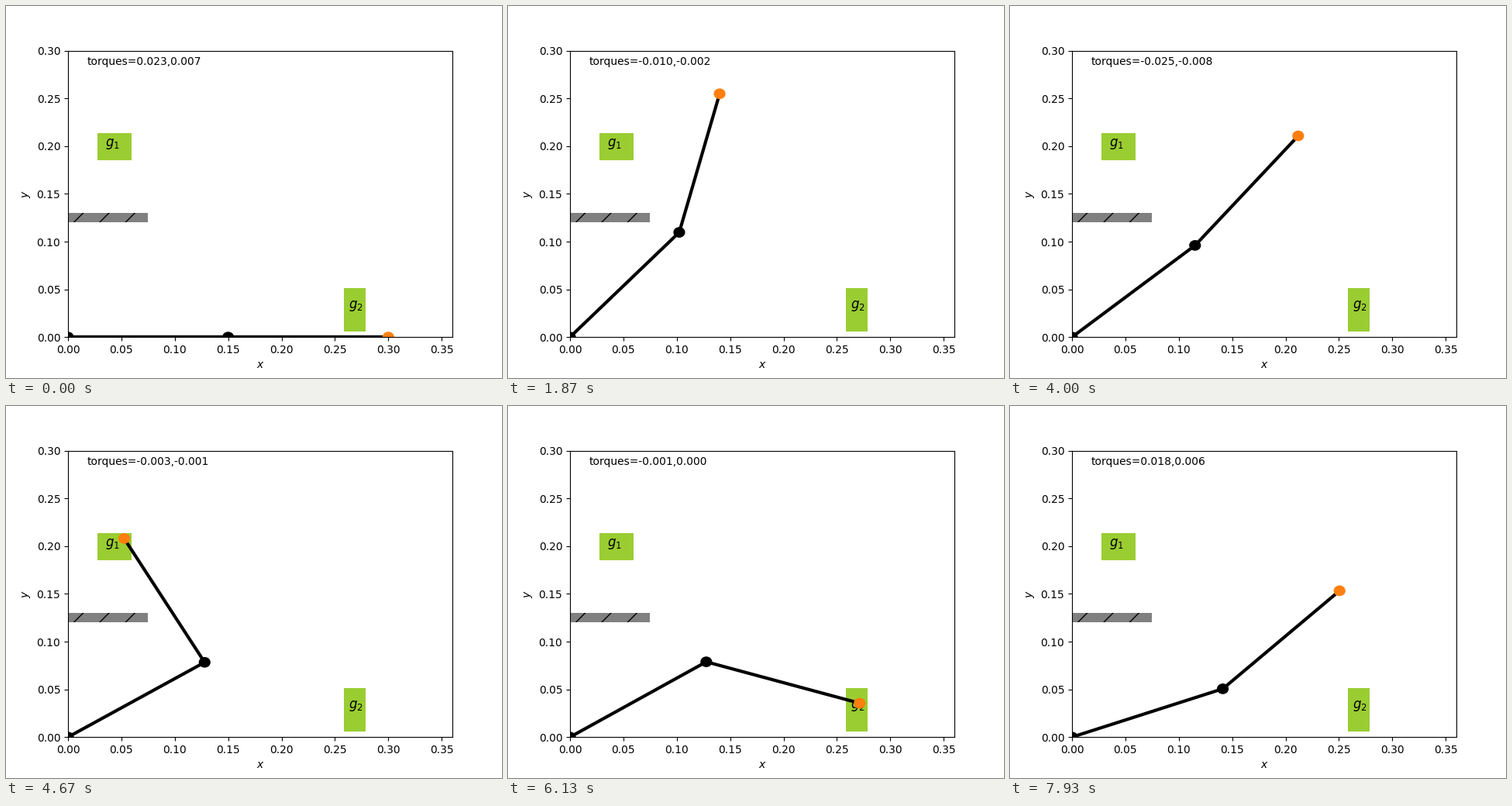
Animation, 640 px wide and 480 px high, one loop 8000 ms. Source, as a matplotlib script:

```python
import matplotlib.pyplot as plt
import numpy as np
from matplotlib.animation import FuncAnimation
from matplotlib.patches import Circle, Rectangle

LOOP_MS = 8000
FRAMES = 120
LINK = 0.15

# step, shoulder angle, elbow angle (degrees), torques
POSES = [
    (0, 0, 0, 0.023, 0.007),
    (28, 47, 28.4, -0.010, -0.002),
    (46, 16, 80.8, -0.003, 0.001),
    (60, 39.8, 10.1, -0.025, -0.008),
    (81, 34.6, -15.2, -0.011, -0.003),
    (102, 30.5, 96.3, 0, 0),
    (118, 19.7, 23.5, 0.018, 0.006),
]


def reach(x, y, side):
    """Joint angles that put the hand on a point."""
    half = np.degrees(np.arccos(np.hypot(x, y) / (2 * LINK)))
    return np.degrees(np.arctan2(y, x)) - side * half, 2 * side * half


def with_visits(poses):
    """Between two poses the hand touches g2 and g1 in turn."""
    goals = reach(0.27, 0.028, -1), reach(0.0435, 0.199, 1)
    path = poses[:1]
    for n, (a, b) in enumerate(zip(poses, poses[1:])):
        visit = a[0] + 0.6 * (b[0] - a[0])
        path += [(visit, *goals[n % 2], 0, 0), b]
    return np.array(path).T


def ease_through(t, v, at):
    """Piecewise cubic that does not overshoot its key values."""
    h = np.diff(t)
    d = np.diff(v) / h
    same = d[:-1] * d[1:] > 0
    a, b = np.where(same, d[:-1], 1), np.where(same, d[1:], 1)
    m = np.zeros(len(t))
    m[1:-1] = np.where(same, 2 * a * b / (a + b), 0)
    m[-1] = d[-1]
    at = np.minimum(at, t[-1])
    i = np.clip(np.searchsorted(t, at, side="right") - 1, 0, len(h) - 1)
    s = (at - t[i]) / h[i]
    return ((1 + 2 * s) * (1 - s) ** 2 * v[i]
            + s * (1 - s) ** 2 * h[i] * m[i]
            + s * s * (3 - 2 * s) * v[i + 1]
            + s * s * (s - 1) * h[i] * m[i + 1])


keys, *tracks = with_visits(POSES)
shoulder, bend, *torques = (ease_through(keys, v, np.arange(FRAMES))
                            for v in tracks)
torques = np.round(torques, 3) + 0.0  # no negative zero
shoulder, bend = np.radians([shoulder, bend])

elbow_x, elbow_y = LINK * np.cos(shoulder), LINK * np.sin(shoulder)
hand_x = elbow_x + LINK * np.cos(shoulder + bend)
hand_y = elbow_y + LINK * np.sin(shoulder + bend)

fig, ax = plt.subplots(figsize=(6.4, 4.8), dpi=100)
ax.set(xlim=(0, 0.36), ylim=(0, 0.3), xlabel="$x$", ylabel="$y$")

ax.add_patch(Rectangle((0.0275, 0.185), 0.032, 0.0285, fc="yellowgreen"))
ax.add_patch(Rectangle((0.2585, 0.006), 0.02, 0.0455, fc="yellowgreen"))
ax.add_patch(Rectangle((0, 0.12), 0.075, 0.01, fc="gray", hatch="/"))
ax.text(0.035, 0.2, "$g_1$", fontsize=12)
ax.text(0.263, 0.03, "$g_2$", fontsize=12)
label = ax.text(0.05, 0.95, "", transform=ax.transAxes)

arm, = ax.plot([], [], color="black", lw=3, zorder=4)


def joint(color):
    return ax.add_patch(Circle((0, 0), 0.005, color=color, zorder=5))


base, elbow, hand = joint("black"), joint("black"), joint("tab:orange")


def draw(i):
    arm.set_data([0, elbow_x[i], hand_x[i]], [0, elbow_y[i], hand_y[i]])
    elbow.center = elbow_x[i], elbow_y[i]
    hand.center = hand_x[i], hand_y[i]
    label.set_text("torques=%.3f,%.3f" % tuple(torques[:, i]))
    return arm, elbow, hand, label


anim = FuncAnimation(fig, draw, frames=FRAMES, interval=LOOP_MS / FRAMES,
                     repeat=True, repeat_delay=0)
plt.show()
```
